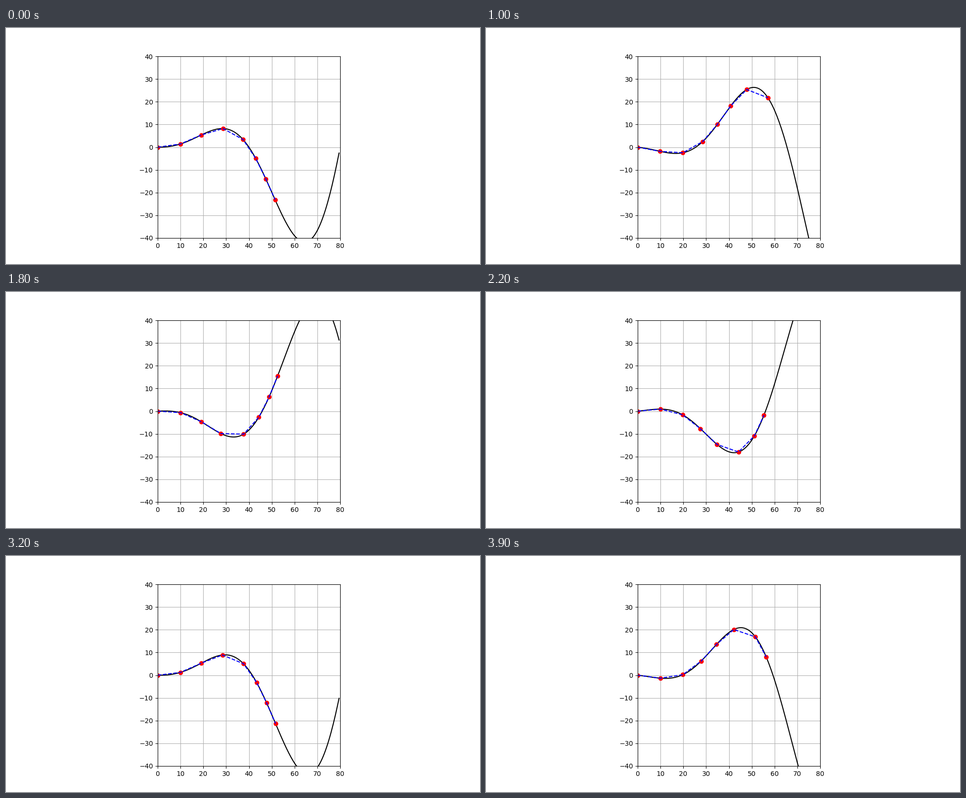
A matplotlib script that plays this animation: 1000 by 500 pixels, repeating every 4 s.

```python
import numpy as np
import matplotlib.pyplot as plt
from matplotlib.animation import FuncAnimation

FRAMES, INTERVAL = 40, 100
WAVE_NUMBER = 2 * np.pi / 80
PHASE_STEP = 0.2
LINKS, LINK_LENGTH = 7, 10


def body(x, phase):
    """Travelling wave whose amplitude grows from head to tail."""
    return (0.11 * x + 0.009 * x**2) * np.sin(WAVE_NUMBER * x - phase)


def next_joint(x0, phase):
    """Bisect for the point on the wave one link length further on."""
    y0 = body(x0, phase)
    low, high = x0, x0 + LINK_LENGTH
    for _ in range(40):
        mid = (low + high) / 2
        if np.hypot(mid - x0, body(mid, phase) - y0) < LINK_LENGTH:
            low = mid
        else:
            high = mid
    return low


def joints(phase):
    xs = [0.0]
    for _ in range(LINKS):
        xs.append(next_joint(xs[-1], phase))
    xs = np.array(xs)
    return xs, body(xs, phase)


fig, ax = plt.subplots(figsize=(10, 5), dpi=100)
ax.set_aspect("equal")
ax.set_xlim(0, 80)
ax.set_ylim(-40, 40)
ax.set_xticks(range(0, 81, 10))
ax.set_yticks(range(-40, 41, 10))
ax.grid()

x = np.arange(0, 80, 0.5)
wave, = ax.plot([], [], "k-")
dots, = ax.plot([], [], "ro")
links, = ax.plot([], [], "b--")


def update(frame):
    phase = PHASE_STEP * frame
    wave.set_data(x, body(x, phase))
    xs, ys = joints(phase)
    dots.set_data(xs, ys)
    links.set_data(xs, ys)
    return wave, dots, links


animation = FuncAnimation(fig, update, frames=FRAMES, interval=INTERVAL,
                          repeat=True, repeat_delay=0)
plt.show()
```
